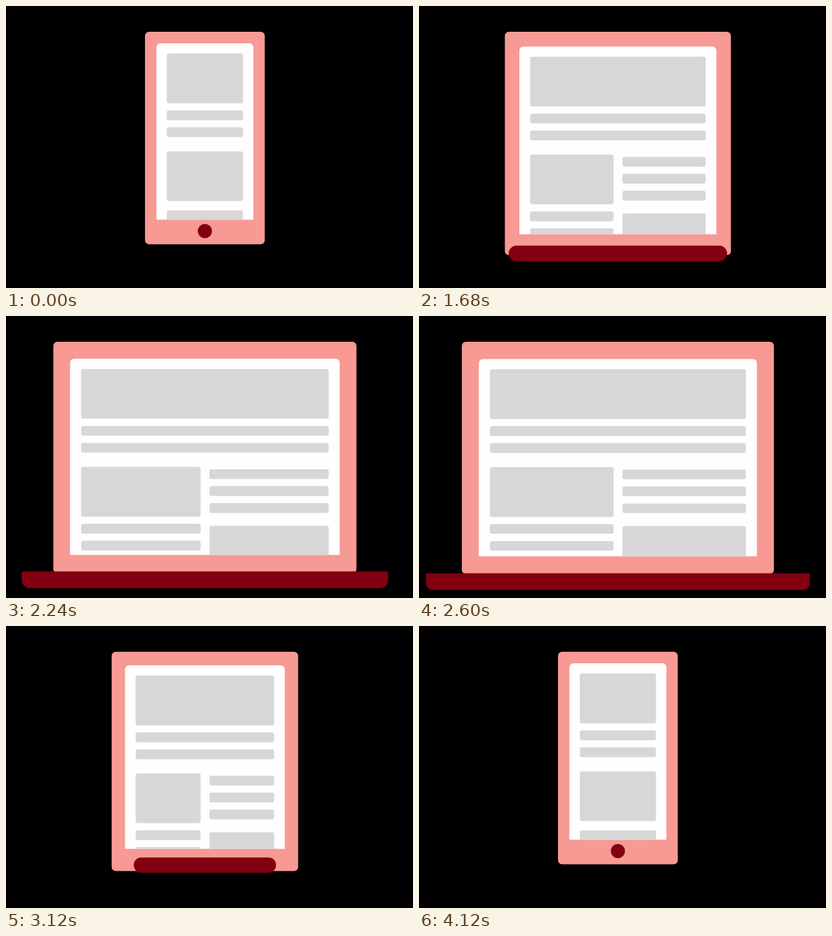
Animation, 600 px wide and 416 px high, one loop 4720 ms. Source, as an HTML page with a canvas:

```html
<!DOCTYPE html>
<html lang="en">
<head>
<meta charset="utf-8">
<title>Responsive device</title>
<style>
  html, body { margin: 0; width: 100%; height: 100%; overflow: hidden; background: #000; }
  canvas { display: block; width: 600px; height: 416px; }
</style>
</head>
<body>
<canvas id="stage" width="600" height="416"></canvas>
<script>
const ctx = document.getElementById('stage').getContext('2d');

const LOOP = 4720, STEP = 40;
const GROW = 1241, SHRINK = 2599, DURATION = 1370, FIRST_MOVE = 1320;
const CENTER = 293.2, GAP = 13, TWO_COLUMNS = 0.33;
const PINK = '#f69a93', WHITE = '#fffdff', GREY = '#d8d6d9', DARK = '#82000f';

const mix = (from, to, p) => from + (to - from) * p;

// Same curve as the CSS keyword "ease": cubic-bezier(.25, .1, .25, 1)
function ease(x) {
  if (x <= 0) return 0;
  if (x >= 1) return 1;
  let low = 0, high = 1, s = 0.5;
  for (let i = 0; i < 24; i++) {
    s = (low + high) / 2;
    if (0.75 * s * (1 - s) + s ** 3 < x) low = s; else high = s;
  }
  return 0.3 * s * (1 - s) ** 2 + 3 * s * s * (1 - s) + s ** 3;
}

function progress(time) {
  if (time < FIRST_MOVE) return 0;
  return time < SHRINK
    ? ease((time - GROW) / DURATION)
    : 1 - ease((time - SHRINK) / DURATION);
}

function box(left, top, right, bottom, radius, color) {
  ctx.beginPath();
  ctx.roundRect(left, top, right - left, bottom - top, radius);
  ctx.fillStyle = color;
  ctx.fill();
}

const centered = (half, top, bottom, radius, color) =>
  box(CENTER - half, top, CENTER + half, bottom, radius, color);

function drawPage(p) {
  const half = mix(56.2, 188.7, p);
  const left = CENTER - half, right = CENTER + half;
  const top = mix(70, 78.6, p);
  const image = (x1, x2, y) => box(x1, top + y, x2, top + y + 73.4, 3, GREY);
  const bars = (x1, x2, y, count) => {
    for (let i = 0; i < count; i++) {
      const barTop = top + y + i * 25;
      box(x1, barTop, x2, barTop + 14.4, 3, GREY);
    }
  };

  image(left, right, 0);
  bars(left, right, 84, 2);
  if (p < TWO_COLUMNS) {
    image(left, right, 144.4);
    bars(left, right, 231.5, 3);
  } else {
    const leftEnd = CENTER + 0.2 - GAP / 2, rightStart = leftEnd + GAP;
    image(left, leftEnd, 144.4);
    bars(left, leftEnd, 228.3, 2);
    bars(rightStart, right, 147.8, 3);
    image(rightStart, right, 231.3);
  }
}

function draw(p) {
  ctx.fillStyle = '#000';
  ctx.fillRect(0, 0, 600, 416);

  centered(mix(88.3, 230.1, p), 38, mix(351.5, 380.5, p), 6, PINK);

  ctx.save();
  const screenBottom = mix(315.2, 354.4, p);
  centered(mix(71.5, 205, p), mix(55, 63.5, p), screenBottom, [6, 6, 0, 0], WHITE);
  ctx.clip();
  drawPage(p);
  ctx.restore();

  // The home button widens into the laptop base.
  const baseTop = mix(321.5, 379.5, p), baseBottom = mix(342.5, 404.3, p);
  const round = (baseBottom - baseTop) / 2;
  const upper = Math.min(round, 50 * (1 - p));
  const lower = Math.min(round, mix(50, 10, p));
  centered(mix(10.5, 283, p), baseTop, baseBottom, [upper, upper, lower, lower], DARK);
}

const start = performance.now();
function frame() {
  const time = (performance.now() - start) % LOOP;
  draw(progress(Math.floor(time / STEP) * STEP));
  requestAnimationFrame(frame);
}
frame();
</script>
</body>
</html>
```
